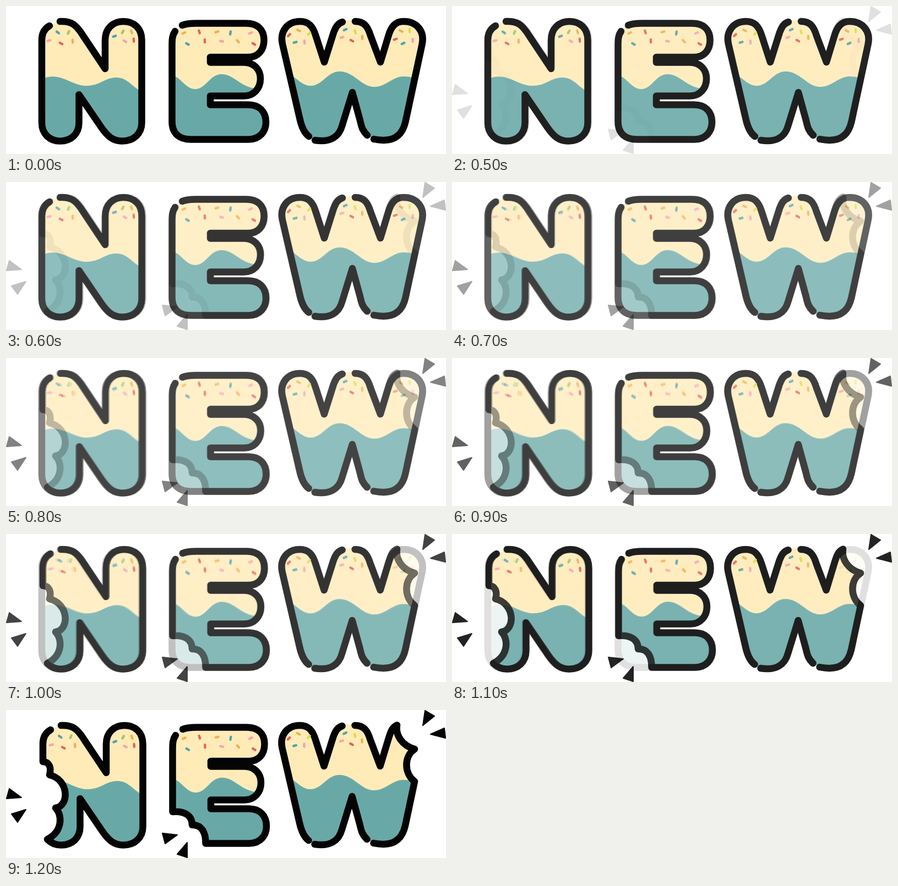
An HTML page that plays this animation: 799 px wide and 269 px high, repeating every 1700 ms.

```html
<!DOCTYPE html>
<html lang="en">
<head>
<meta charset="utf-8">
<title>NEW</title>
<style>
  html, body { margin: 0; height: 100%; overflow: hidden; background: #fff; }
  svg { display: block; width: 100%; height: 100%; }
  .outline { fill: none; stroke: #040404; stroke-width: 12.5; stroke-linecap: round; stroke-linejoin: round; }
  .sprinkle { stroke-width: 4.4; stroke-linecap: round; }
  .crumb { fill: #040404; stroke: #040404; stroke-width: 2; stroke-linejoin: round; }
</style>
</head>
<body>
<svg viewBox="0 0 799 269">
  <g id="bitten"></g>
  <g id="whole"></g>
</svg>
<script>
const CREAM = '#ffebb8', TEAL = '#68a9a7';
const COLORS = { t: '#55a3ac', g: '#9bca62', p: '#f3a6ae', r: '#e2655b', o: '#f0b150', y: '#dbdf3c' };

// In letter paths, G marks a gap: the outline breaks there, the filling does not.
const N_REST = 'V161 L172 219 C185 238 195 245.5 211 245.5 C232 245.5 246.5 232 246.5 212 V62 ' +
  'C246.5 41 233 28 213 28 C194 28 180 41 180 62 V114 L140 54 C127 33 118 27 98 28';
const N_WAVE = 'M60 135 C98 115 115 145 147 145 C170 145 180 130 200 130 C222 130 228 148 250 157 V250 H60Z';

const E_REST = 'H440 C461 242.5 472 228 472 211 C472 192 460 179.5 440 179.5 H371 V163.5 H432 ' +
  'C450 163.5 462 150 462 132 C462 115 450 102.5 432 102.5 H371 V93 H440 ' +
  'C458 93 468.5 80 468.5 62 C468.5 42 456 31.5 436 31.5 H345 C333 31.5 327 32 320 35';
const E_WAVE = 'M299 125 C318 128 325 151 344 151 C363 151 370 124 391 124 C415 124 425 148 455 150 H482 V250 H299Z';

const W_START = 'M611 29 C602 32 599 38 595 48 L578 102 L562.5 54 C557 36 549 28 534 28 ' +
  'C511 28 497 46 502 69 L533.5 205 C537 221 542 231 550 237 G561 244 C588 248.5 605 238 610.5 217 ' +
  'L629 157 L643 208 C646 222 648 227 656 235 G668 242 C702 249 719.5 237 725.5 210';
const W_TOP_RIGHT = 'L755.5 70 C761 45 745 28 722 28 C706 28 699 39 694.5 54';
const W_BITE = 'L742.5 130 C723 115 723 84 742.5 71 C720 65 707.5 46 710.5 27.5 C702 31 699 39 694.5 54';
const W_END = 'L680 102 L662 54 C657 37 650 28 634 28';
const W_WAVE = 'M495 116 C522 120 533 145 553 145 C575 145 583 119 606 119 C632 119 645 147 669 147 ' +
  'C690 147 702 128 722 128 C740 128 750 135 765 140 V250 H495Z';

// Sprinkles: color key, x, y, angle; d is the group's shift on the bitten letter (null: eaten).
const N_SPRINKLES = [
  { d: [4.3, .5], list: 't 94 48 35,g 113.5 48 -65,p 78 63 -15,r 100 68 28,o 121 64 88' },
  { d: [.7, 2.5], list: 't 197 55 -20,g 212 47 -60,o 228 47 72,p 216 64 30,r 232 62 86' }
];
const E_SPRINKLES = [
  { d: [.4, 2.3], list: 'o 323 49 -25,r 351 47 72,o 383 47 -15,t 407.5 49 100,p 444 49 -25,' +
    't 329.5 69 30,r 361 63.5 88,p 391.5 64 12,o 421 64 48,r 450 69 30' }
];
const W_SPRINKLES = [
  { d: [-.5, -1.2], list: 'r 514 53 -45,o 531.5 44.5 28,y 550.5 50 -50,t 525 66 -15,p 542 65.5 88' },
  { d: [-.5, -.8], list: 't 616 43 -25,y 634 47 72,p 610 57 -15,r 628 63 28,o 647 57 88' },
  { d: null, list: 'o 717.5 45.5 28,y 733 44.5 90,r 707 60.5 -18,t 721 68 -25,p 738.5 62.5 90' }
];

const letters = [
  {
    wave: N_WAVE, sprinkles: N_SPRINKLES, shift: [2, 0], waveShift: [0, -1], close: 'Z',
    whole: 'M79 36 C70 41 65 50 65 62 V212 C65 233 80 245.5 98 245.5 C118 245.5 132.5 233 132.5 212 ' + N_REST,
    bitten: 'M79 36 C70 41 65 50 65 62 V94 C76 94 81 104 77 118 C112 126 114 174 88 178 ' +
      'C100 190 102 220 73 235 C80 242 88 245.5 98 245.5 C118 245.5 132.5 233 132.5 212 ' + N_REST
  },
  {
    wave: E_WAVE, sprinkles: E_SPRINKLES, shift: [1, 0], waveShift: [0, -1], close: 'Z',
    whole: 'M307 46 C302 53 301.5 60 301.5 72 V210 C301.5 232 315 242.5 336 242.5 ' + E_REST,
    bitten: 'M307 46 C302 53 301.5 60 301.5 72 V185 C322 183 337 191 337 209 ' +
      'C354 208 362 223 361.5 242.5 ' + E_REST
  },
  {
    wave: W_WAVE, sprinkles: W_SPRINKLES, shift: [-.5, 0], waveShift: [0, -1], close: 'Q622 23 611 29Z',
    whole: W_START + W_TOP_RIGHT + W_END,
    bitten: W_START + W_BITE + W_END
  }
];

const crumbs = 'M6 143 28 159 1 161ZM10 189 36 181 21 204ZM284 224 311 227 289 243Z' +
  'M329 241V268L311 262ZM761 1 778 11 757 28ZM796 33 771 44 798 51Z';

const move = ([x, y]) => `transform="translate(${x} ${y})"`;

function sprinkleGroup({ d, list }, bitten) {
  if (bitten && !d) return '';
  const marks = list.split(',').map(item => {
    const [color, x, y, angle] = item.split(' ');
    return `<path class="sprinkle" stroke="${COLORS[color]}" d="M-2.5 0H2.5"
      transform="translate(${x} ${y}) rotate(${angle})"/>`;
  });
  return `<g ${move(bitten ? d : [0, 0])}>${marks.join('')}</g>`;
}

function drawLetter(letter, index, state) {
  const bitten = state === 'bitten';
  const path = letter[state];
  const shape = path.replace(/G/g, 'L') + letter.close;
  const id = state + index;
  const still = [0, 0];
  return `<g ${move(bitten ? letter.shift : still)}>
      <clipPath id="${id}"><path d="${shape}"/></clipPath>
      <path d="${shape}" fill="${CREAM}"/>
      <g clip-path="url(#${id})">
        <path d="${letter.wave}" fill="${TEAL}" ${move(bitten ? letter.waveShift : still)}/>
      </g>
      <path class="outline" d="${path.replace(/G/g, 'M')}"/>
    </g>` + letter.sprinkles.map(group => sprinkleGroup(group, bitten)).join('');
}

const layers = {};
for (const state of ['bitten', 'whole']) {
  layers[state] = document.getElementById(state);
  layers[state].innerHTML = letters.map((letter, i) => drawLetter(letter, i, state)).join('');
}
layers.bitten.innerHTML += `<path class="crumb" d="${crumbs}"/>`;

// Hold the whole word, cross-fade in eight hard steps, hold the bitten word.
const LOOP = 1700, HOLD = 500, STEP = 100, STEPS = 8;
const start = performance.now();

function render(now) {
  const time = Math.max(0, now - start) % LOOP;
  const step = Math.floor((time - HOLD) / STEP) + 1;
  const fade = Math.min(STEPS, Math.max(0, step)) / STEPS;
  layers.bitten.setAttribute('opacity', fade);
  layers.whole.setAttribute('opacity', 1 - fade);
  requestAnimationFrame(render);
}
render(start);
</script>
</body>
</html>
```
